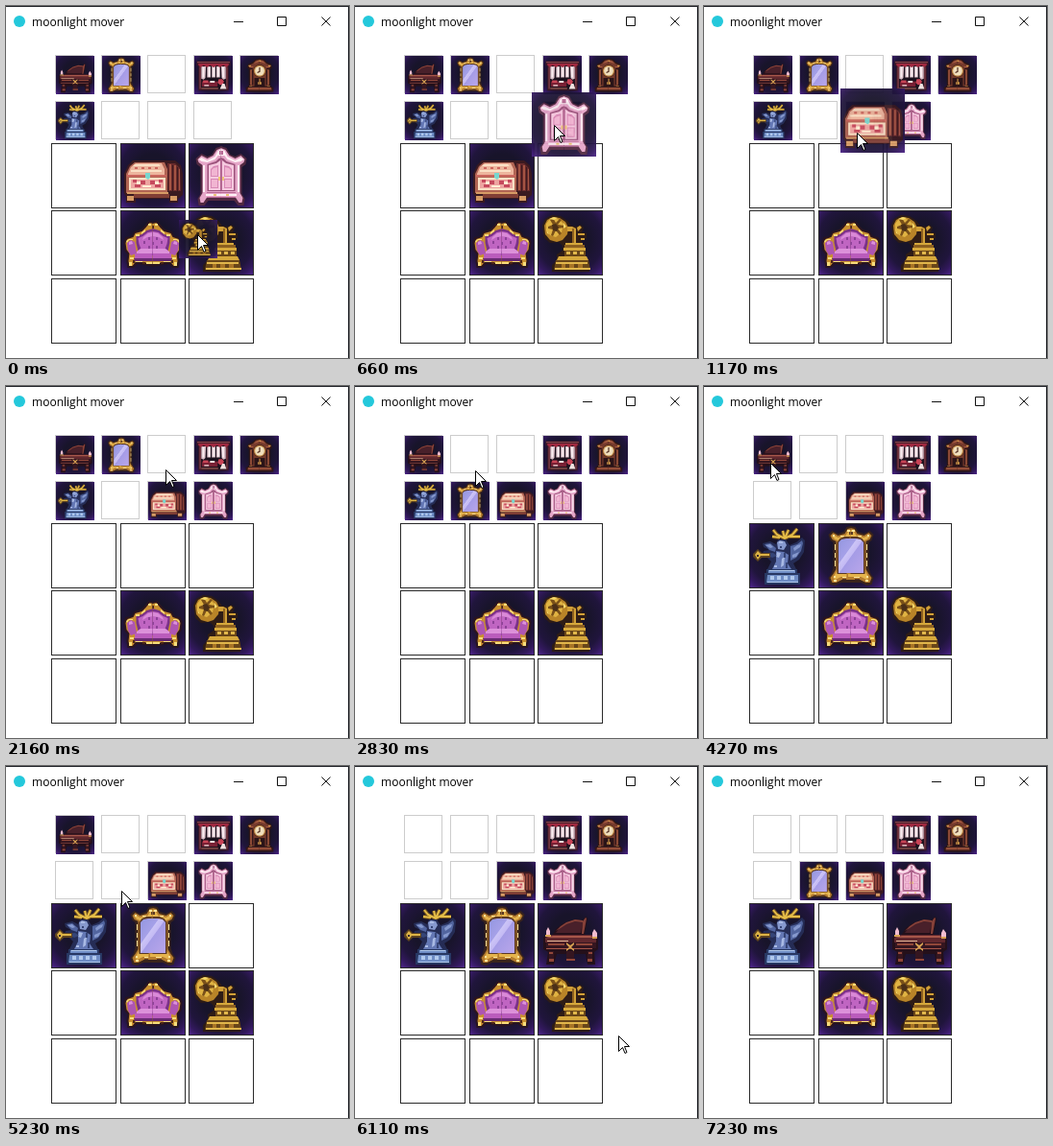
An HTML page for the animation above (7760 ms loop, 357 by 367 pixels).

```html
<!DOCTYPE html>
<html lang="en">
<head>
<meta charset="utf-8">
<title>moonlight mover</title>
<style>
  html, body { margin: 0; width: 100%; height: 100%; overflow: hidden; background: #fff; }
  svg { display: block; }
  #stage { width: 357px; height: 367px; }
  .small { fill: #fff; stroke: #ccc; }
  .big { fill: #fff; stroke: #2a2a2a; }
  .buttons { fill: none; stroke: #111; }
  .title { font: 12px "Open Sans", "Noto Sans", sans-serif; fill: #000; }
</style>
</head>
<body>
<svg id="stage" viewBox="0 0 357 367">
  <defs>
    <radialGradient id="night" cx=".5" cy=".45" r=".74">
      <stop offset=".4" stop-color="#18142a"/>
      <stop offset=".7" stop-color="#20153c"/>
      <stop offset=".86" stop-color="#32195c"/>
      <stop offset="1" stop-color="#4c2488"/>
    </radialGradient>
    <linearGradient id="glass" x2="1" y2="1">
      <stop offset="0" stop-color="#9497e0"/>
      <stop offset=".36" stop-color="#a5a0e8"/>
      <stop offset=".38" stop-color="#cbc4f6"/>
      <stop offset=".5" stop-color="#c4baf4"/>
      <stop offset=".52" stop-color="#a59ce6"/>
      <stop offset="1" stop-color="#b9a6ea"/>
    </linearGradient>
    <rect id="back" width="66" height="66" fill="url(#night)"/>

    <!-- Symmetric furniture is drawn as a left half and flipped. -->
    <g id="sofaHalf">
      <path fill="#2a1420" d="M33.5 11l-5-1-4 5-4 4-7 2-3 5-6 1-2 5 1 9 3 4-1 7 1 7h6l4-4 17 3z"/>
      <path fill="#c98f30" d="M33.5 13l-4-1-4 5-4 4-7 2-2 4-6 2-2 4 1 7 3 4-1 8 1 5h3l4-5 18 3z"/>
      <path fill="#7a3188" d="M33.5 18l-7 2-5 4-6 2v7l3 13h15.500z"/>
      <path fill="#c065c2" d="M33.500 21l-6 1-5 4-5 2 1 6 3 8h12z"/>
      <path fill="#da8bd8" d="M33 22l-5 1-5 4-1 3 5-3 6-1z"/>
      <path fill="#8e4298" d="M23 31h2v3h-2zm5 5h2v3h-2zm0-9h2v3h-2zm4 5h1.500v3H32z"/>
      <path fill="#ae55b2" d="M6 33l4-3 4 2 2 12-6 2-3-5z"/>
      <path fill="#dc91da" d="M8 32l3-1 1 3-4 1zM16 42l4-3h13.500v5H16z"/>
      <path fill="#ba5cbc" d="M14 44h19.500v5H14z"/>
      <path fill="#682a74" d="M13 49h20.500v3H14z"/>
      <path fill="#f7dc7c" d="M28 13h3v2h-3zm-7 9l4-3v2l-4 3zm-6 2h4v2h-4zM5 31l3-2h4v1H8l-2 3zM9 48h4v2H9zm6 4h7v1h-7zm11 1h7v2h-7zM8 53h3v4H8z"/>
      <path fill="#4a2418" d="M22 53h3v2h-3zm-10-2h2v3h-2zM32 15h1.500v3H32z"/>
    </g>
    <g id="wardrobeHalf">
      <path fill="#532a42" d="M33.500 2l-6 2-4 7-5 2-6-3-6 5 1 6 4 3v28l-3 5 1 7h6l4-5h13.500z"/>
      <path fill="#e5a6c8" d="M33.500 4l-5 2-4 6-6 3-6-3-4 4 1 3 4 3v29l-3 5 1 5h3l4-6h14.500z"/>
      <path fill="#fff0f5" d="M33.500 5l-4 2-3 6-8 4-6-3-3 2 3 2 6 1 8-3 3-4h4zM14 22h2v28h-2zm3 30h16.500v2H17z"/>
      <path fill="#9c527b" d="M33.500 14l-3 1-3 3-9 3v28h15z"/>
      <path fill="#f6c9df" d="M32 17l-4 3-8 2v26h12z"/>
      <path fill="#d888b5" d="M30 22l-5 1-3 3v8h8zm-8 14h8v10h-8z"/>
      <path fill="#f1b5d2" d="M29 24l-4 1-2 2v6h6zm-6 13h6v8h-6z"/>
      <path fill="#b86995" d="M32 16h1.500v32H32zM18 50h15.500v1H18zm0 5h15.500v1H18zM31 7h2.500v4H31z"/>
      <path fill="#edc477" d="M30 34h2v4h-2zm-5 18h3v2h-3z"/>
    </g>
    <g id="mirrorHalf">
      <path fill="#3a241c" d="M33.500 2l-5 1-3 5-6 2-6-3-4 4 2 6 3 2v27l-2 6-3 4 2 7 5 1 6-3h13z"/>
      <path fill="#b57c2e" d="M33.500 4l-4 1-3 5-7 2-5-3-3 3 2 4 4 2v29l-3 5-3 4 2 5h4l6-3h14.500z"/>
      <path fill="#e5b44d" d="M33.500 6l-3 1-3 5-8 2-5-3-1 2 3 3 3 1v30l-3 5-2 4 2 2 6-3h13.500v-3H20V17l6-4h7.500z"/>
      <path fill="#5c3924" d="M33.500 13h-7l-5 2-3 4v33h15zM31 8h2.500v3H31zM24 57h5v1h-5z"/>
      <path fill="#fbe59b" d="M29 6h3v2h-3zm-15 5h2v2h-2zm8 1h4v1h-4zm-6 9h1v6h-1zm0 9h1v5h-1zm0 8h1v6h-1zm-1 16h2v2h-2zm0 4h3v2h-3zm9-3h6v1h-6z"/>
    </g>
    <g id="clockHalf">
      <path fill="#2f1716" d="M33.500 4l-8 2-5 5-7 3-2 6 3 4v27l-5 4v7h24z"/>
      <path fill="#753a2c" d="M33.500 6l-7 2-5 5-6 3-1 3 3 4v29l-5 4v3h21z"/>
      <path fill="#a55a40" d="M33.500 7l-6 2-5 4 5-1 6-2zM15 18h7v2h-7zm2 6h2v26h-2zm-4 31h20.500v2H13z"/>
      <path fill="#2a1418" d="M20 24h2v26h-2zm4 14h9.500v14H24zM14 21h7v2h-7zm-1 31h20.500v2H13z"/>
      <path fill="#d39c4b" d="M14 16h4v2h-4zm17-8h2.500v2H31zm1 31h1.500v10H30v-4h2zM15 51h5v1h-5z"/>
    </g>

    <symbol id="sofa" viewBox="0 0 66 66">
      <use href="#back"/><use href="#sofaHalf"/>
      <use href="#sofaHalf" transform="matrix(-1 0 0 1 66 0)"/>
    </symbol>
    <symbol id="wardrobe" viewBox="0 0 66 66">
      <use href="#back"/><use href="#wardrobeHalf"/>
      <use href="#wardrobeHalf" transform="matrix(-1 0 0 1 66 0)"/>
    </symbol>
    <symbol id="mirror" viewBox="0 0 66 66">
      <use href="#back"/><use href="#mirrorHalf"/>
      <use href="#mirrorHalf" transform="matrix(-1 0 0 1 66 0)"/>
      <path fill="url(#glass)" d="M20 19l3-3 5-1h10l5 1 3 3v32H20z"/>
    </symbol>
    <symbol id="clock" viewBox="0 0 66 66">
      <use href="#back"/><use href="#clockHalf"/>
      <use href="#clockHalf" transform="matrix(-1 0 0 1 66 0)"/>
      <circle cx="33" cy="26" r="11" fill="#482319"/>
      <circle cx="33" cy="26" r="10" fill="#c18a48"/>
      <circle cx="33" cy="26" r="8" fill="#f0dfbd"/>
      <path stroke="#533024" stroke-width="2" fill="none" d="M33 20v7l-4 2"/>
    </symbol>

    <symbol id="gramophone" viewBox="0 0 66 66">
      <use href="#back"/>
      <path fill="#2e1c16" d="M4 15l3-7 7-4 9 1 7 5 4 5 6 1 4-2 3 3-2 5 5 1v5l-5 2v10l4 2v7l4 5v9H14v-7l5-5v-6l6-4v-5l-4-4-9 1-6-5z"/>
      <path fill="#b88428" d="M6 15l3-6 6-3 7 1 6 4 3 6-1 7-5 6-6 2-7-2-5-6z"/>
      <path fill="#e0b343" d="M8 13l3-4 5-2 6 2 4 4-2 9-6 5-6-2-4-6z"/>
      <path fill="#795019" d="M12 9l3 5-5 2v2l5 1-2 6 2 1 3-6 4 5 2-2-4-5 7-1v-2l-7-1 4-5-2-1-4 4-3-5z"/>
      <path fill="#4b3018" d="M14 14l4-1 3 4-2 4-4-1z"/>
      <path fill="#f5d86c" d="M11 8l5-2 4 1-4 2zm15 4l3 4-3 2zM8 18l3 6-2-1z"/>
      <path fill="#d1a038" d="M30 16h5l4 2v16h-4V21h-5zm10 1l3-2 2 2-4 4zm1 6h7v2h-7zm3 5h4v2h-4z"/>
      <path fill="#8d6020" d="M35 18h2v16h-2zM27 35h21v3H27z"/>
      <path fill="#d6a83c" d="M28 33h18v2H28zm-2 5h23v3H26zM21 47h29l2 4H19z"/>
      <path fill="#694619" d="M27 41h22v6H27zM18 51h34l2 10H16z"/>
      <path fill="#e0b64b" d="M29 42h4v3h-4zm7 0h4v3h-4zm7 0h4v3h-4zM18 53h33v2H18zm-1 6h37v2H17z"/>
      <path fill="#a97526" d="M24 55h4v4h-4zm8 0h5v4h-5zm9 0h5v4h-5z"/>
    </symbol>

    <symbol id="chest" viewBox="0 0 66 66">
      <use href="#back"/>
      <path fill="#3a1a20" d="M3 31l4-9 5-5h44l6 5 2 9v22l-5 4v4h-9v-4H15v4H5v-6l-2-4z"/>
      <path fill="#b06453" d="M5 31l4-8 5-4h31l3 7v25H5z"/>
      <path fill="#edb59d" d="M7 31l3-7 5-4h27l3 6v6H7z"/>
      <path fill="#fae0c5" d="M14 21h25l2 2H12zM10 27h32v2H10zM8 35h38v13H8z"/>
      <path fill="#cb665e" d="M14 24h3v2h-3zm7 0h3v2h-3zm7 0h3v2h-3zm7 0h3v2h-3zM6 32h41v2H6z"/>
      <path fill="#eda4a0" d="M10 37h34v9H10z"/>
      <path fill="#c64a5d" d="M12 37h4v3h-4zm2 5h6v3h-6zm6-4h5v4h-5zm10 0h5v4h-5zm5 4h6v3h-6zm4-5h4v3h-4z"/>
      <path fill="#fff0d5" d="M16 39h4v3h-4zm19 0h4v3h-4zM22 43h9v2h-9z"/>
      <path fill="#78d7cf" d="M25 30h5v5l-2 2-3-2z"/>
      <path fill="#682b2c" d="M48 20h8l5 5 1 24H49z"/>
      <path fill="#a45443" d="M50 21h2v27h-2zm5 1h2v26h-2zm5 4h1v22h-1z"/>
      <path fill="#3d1a1d" d="M53 22h1v27h-1zm5 2h1v25h-1z"/>
      <path fill="#d69b65" d="M6 50h43v2H6zm0 4h7v5H6zm45 0h7v5h-7z"/>
      <path fill="#803e35" d="M13 52h37v4H13z"/>
    </symbol>

    <symbol id="angel" viewBox="0 0 66 66">
      <use href="#back"/>
      <path fill="none" stroke="#70501e" stroke-width="4" d="M24 6l4 5 8 4 8-4 5-6M34 7l2 8 4-9M23 13l8 1m10-1h11"/>
      <path fill="none" stroke="#e5bd48" stroke-width="2" d="M24 6l4 5 8 4 8-4 5-6M34 7l2 8 4-9M23 13l8 1m10-1h11"/>
      <path fill="#252c55" d="M13 20l8-2 6 3 2-5h8l4 6 7-3 6-5 3 3-1 12-5 8-6 4 4 8H17l5-10-5-5-5-1 2-5 6-1-6-3z"/>
      <path fill="#52659f" d="M15 21l6-1 6 5-1 4-6-2zm27 2l7-2 5-4 1 3-2 8-5 7-6 3z"/>
      <path fill="#8699ce" d="M28 19l3-2 5 1 2 4-3 5-6-1zm17 6l4-3 4-1-1 3-6 4zm-1 7l7-3-3 5-4 1zM16 22l5-1 3 3-3 1z"/>
      <path fill="#6377b4" d="M27 28l8 1 5 3-1 9 4 6H23l4-8z"/>
      <path fill="#a9bae4" d="M28 29l4 1-2 5-3-1zm5 7l3-2-1 9-3 2zM30 18h4v2h-4zm-5 25h3v2h-3z"/>
      <path fill="#364577" d="M31 23h2v2h-2zm4 7h2v5h-2zm2 10h2v6h-2zM14 31l10-1 4 3-5 2z"/>
      <path fill="#5e4320" d="M3 31l5-5 4 4h9v5h-9l-4 4-5-5z"/>
      <path fill="#ddb446" d="M5 32l3-4 3 3h9v2h-9l-3 4z"/>
      <path fill="#3b2a2c" d="M7 32h2v2H7z"/>
      <path fill="#283863" d="M17 47h32v4h3v12H15V51h2z"/>
      <path fill="#6e8cc4" d="M19 48h28v3H19zm-1 5h32v8H17z"/>
      <path fill="#b1c9ed" d="M20 48h26v1H20zm1 6h4v4h-4zm7 0h4v4h-4zm7 0h4v4h-4zm7 0h4v4h-4zM18 60h32v1H18z"/>
    </symbol>

    <symbol id="piano" viewBox="0 0 66 66">
      <use href="#back"/>
      <path fill="#24101a" d="M14 33l5-8 7-5 11-4 9 1 3-4 2 2-3 17h12l2 4v11l-4 3 1 13h-8l-2-11H19l-3 11H8l2-13-5-3V34z"/>
      <path fill="#49202a" d="M18 30l4-5 6-4 10-3 8 1-2 11z"/>
      <path fill="#864139" d="M18 28l5-5 6-4 9-3 8 1v2l-8-1-9 3-6 4zM46 18l3-4 1 1-3 16h-2z"/>
      <path fill="#61282e" d="M7 35l7-3h42l4 3v5H7z"/>
      <path fill="#a8574a" d="M8 35l7-2h39l4 2zm0 11h48v1H8z"/>
      <path fill="#e0b797" d="M9 38h22v1H9z"/>
      <path fill="#351620" d="M8 40h52v6H8zm3 9h5v11h-5zm40 0h5v11h-5zm-22 0h8v9h-8z"/>
      <path fill="#914739" d="M10 41h17v2H10zm29 0h17v2H39zM11 50h4v2h-4zm41 0h4v2h-4zM11 57h5v3h-5zm40 0h5v3h-5zm-22 0h9v2h-9z"/>
      <path fill="#f2bdd0" d="M8 28l2-4 2 4v4H8zm48 2l2-4 3 4v4h-5z"/>
      <path fill="#d8a252" d="M7 32h6v2H7zm49 2h5v2h-5zM29 40l4 3 4-3v2l-3 3 3 2v2l-4-3-4 3v-2l3-2-3-3z"/>
    </symbol>

    <symbol id="bed" viewBox="0 0 66 66">
      <use href="#back"/>
      <path fill="#3c1825" d="M4 9h58v8h-3v43H7V17H4z"/>
      <path fill="#87434b" d="M5 10h56v2H5zm4 9h2v38H9zm46 0h2v38h-2z"/>
      <path fill="#1b111d" d="M12 17h42v41H12z"/>
      <path fill="#d9bdc6" d="M12 18h8l-1 20-3 3-4-2zm10 0h6v19h-6zm8 0h6v19h-6zm8 0h6v19h-6zm8 0h8v21l-4 2-3-3z"/>
      <path fill="#f8edf0" d="M14 20h3v17h-3zm10 0h3v16h-3zm8 0h3v16h-3zm8 0h3v16h-3zm8 0h3v17h-3z"/>
      <path fill="#9f2940" d="M7 13h52v3l-4 4-5-4-6 4-5-4-6 4-6-4-5 4-6-4-5 4-4-4z"/>
      <path fill="#792034" d="M13 44h27v9H13z"/>
      <path fill="#c94457" d="M15 42h9v4h-9zm27-2h6l3 4-2 5-5 1-4-4z"/>
      <path fill="#f0e1df" d="M27 43h8v3h-8zm21 5h4l3 9H44zM17 50h8v2h-8z"/>
      <path fill="#a66057" d="M12 55h29v2H12z"/>
    </symbol>
  </defs>

  <rect width="357" height="367" fill="#fff"/>
  <circle cx="14" cy="16" r="6" fill="#24c8db"/>
  <text class="title" x="27" y="21">moonlight mover</text>
  <path class="buttons" d="M237 16.5h10M282.5 11.5h9v9h-9z"/>
  <path class="buttons" d="M328.5 11.5l9 9m0-9l-9 9"/>
  <path fill="#24262c" d="M0 0h357v1H0zM356 0h1v367h-1z"/>
  <g id="slots"></g>
  <use id="ghost" opacity=".95"/>
  <path id="cursor" fill="#fff" stroke="#000" d="M.5 .5V16.5L4.500 12.500 7 18.500 9 17.500 6.500 11.500H11.500z"/>
</svg>

<script>
const $ = id => document.getElementById(id);
const LOOP = 7760, STEP = 122, CURSOR_GONE = 7230;

// Slots 0-8 are the small shelf, 9-17 the big board.
const startItems = { 0: 'piano', 1: 'mirror', 3: 'bed', 4: 'clock', 5: 'angel',
  10: 'chest', 11: 'wardrobe', 13: 'sofa', 14: 'gramophone' };

// [time, from, to]
const drops = [[660, 11, 8], [1170, 10, 7], [2680, 1, 6], [3490, 6, 10],
  [4150, 5, 9], [5740, 0, 11], [6840, 10, 6]];

const drag = (start, end, item, dx, dy, size = 40) => ({ start, end, item, dx, dy, size });
const drags = [
  drag(0, 150, 'gramophone', 19, 15),
  drag(540, 780, 'wardrobe', 23, 34, 67),
  drag(1050, 1320, 'chest', 17, 46, 67),
  drag(1740, 2010, 'mirror', 22, 19),
  drag(2680, 2830, 'mirror', 22, 19),
  drag(3370, 3610, 'mirror', 23, 19),
  drag(4030, 4270, 'angel', 31, 16),
  drag(4390, 4690, 'piano', 18, 29),
  drag(5620, 5860, 'piano', 24, 27),
  drag(6690, 6960, 'mirror', 28, 45, 67)
];

// Each gesture starts at a time and advances one point per step.
const stops = [];
const gesture = (start, ...points) =>
  points.forEach(([x, y], i) => stops.push({ at: Math.floor((start + i * STEP) / 10) * 10, x, y }));

gesture(0, [199, 238]);
gesture(150, [208, 246], [213, 215], [213, 177]);
gesture(540, [211, 150], [207, 124], [190, 150]);
gesture(930, [136, 188], [148, 160], [159, 132]);
gesture(1320, [159, 125], [158, 86]);
gesture(1590, [121, 70]);
gesture(1740, [143, 71], [145, 71]);
gesture(2010, [141, 71]);
gesture(2160, [166, 87], [178, 119], [141, 100]);
gesture(2560, [121, 71], [110, 127]);
gesture(2830, [125, 88]);
gesture(2980, [127, 140], [115, 160]);
gesture(3250, [122, 118], [133, 159], [145, 185], [115, 180], [72, 158]);
gesture(3880, [82, 115]);
gesture(4030, [82, 140], [84, 170], [69, 80], [127, 129]);
gesture(4540, [178, 180]);
gesture(4690, [190, 182], [201, 185]);
gesture(4960, [203, 242], [167, 174]);
gesture(5230, [120, 130], [78, 87]);
gesture(5500, [75, 78], [150, 125], [220, 180], [235, 220], [255, 305], [274, 281]);
gesture(6260, [215, 250], [150, 208]);
gesture(6540, [147, 188]);
gesture(6690, [125, 149]);
gesture(6840, [111, 126], [121, 129]);
gesture(7110, [202, 270]);

const add = (tag, attrs) => {
  const node = document.createElementNS('http://www.w3.org/2000/svg', tag);
  for (const key in attrs) node.setAttribute(key, attrs[key]);
  return $('slots').appendChild(node);
};

const slots = Array.from({ length: 18 }, (_, i) => {
  const small = i < 9, n = i - 9;
  const x = small ? 51 + i % 5 * 48 : [47, 119, 190][n % 3];
  const y = small ? 51 + Math.floor(i / 5) * 48 : [143, 213, 284][Math.floor(n / 3)];
  const side = small ? 39 : 67, inner = small ? 40 : 66;
  add('rect', { class: small ? 'small' : 'big', x: x + .5, y: y + .5, width: side, height: side });
  return add('use', { x: x + 1, y: y + 1, width: inner, height: inner });
});

function show(node, item) {
  node.style.display = item ? '' : 'none';
  if (item && node.getAttribute('href') !== '#' + item) node.setAttribute('href', '#' + item);
}

function draw(t) {
  const items = { ...startItems };
  for (const [at, from, to] of drops) {
    if (t < at) break;
    items[to] = items[from];
    delete items[from];
  }
  slots.forEach((slot, i) => show(slot, items[i]));

  const { x, y } = stops.findLast(stop => stop.at <= t);
  $('cursor').setAttribute('transform', `translate(${x} ${y})`);
  $('cursor').style.display = t < CURSOR_GONE ? '' : 'none';

  const held = drags.find(d => t >= d.start && t < d.end);
  show($('ghost'), held && held.item);
  if (held) {
    const box = { x: x - held.dx, y: y - held.dy, width: held.size, height: held.size };
    for (const key in box) $('ghost').setAttribute(key, box[key]);
  }
}

const origin = performance.now();
function tick() {
  draw((performance.now() - origin) % LOOP);
  requestAnimationFrame(tick);
}
tick();
</script>
</body>
</html>
```
